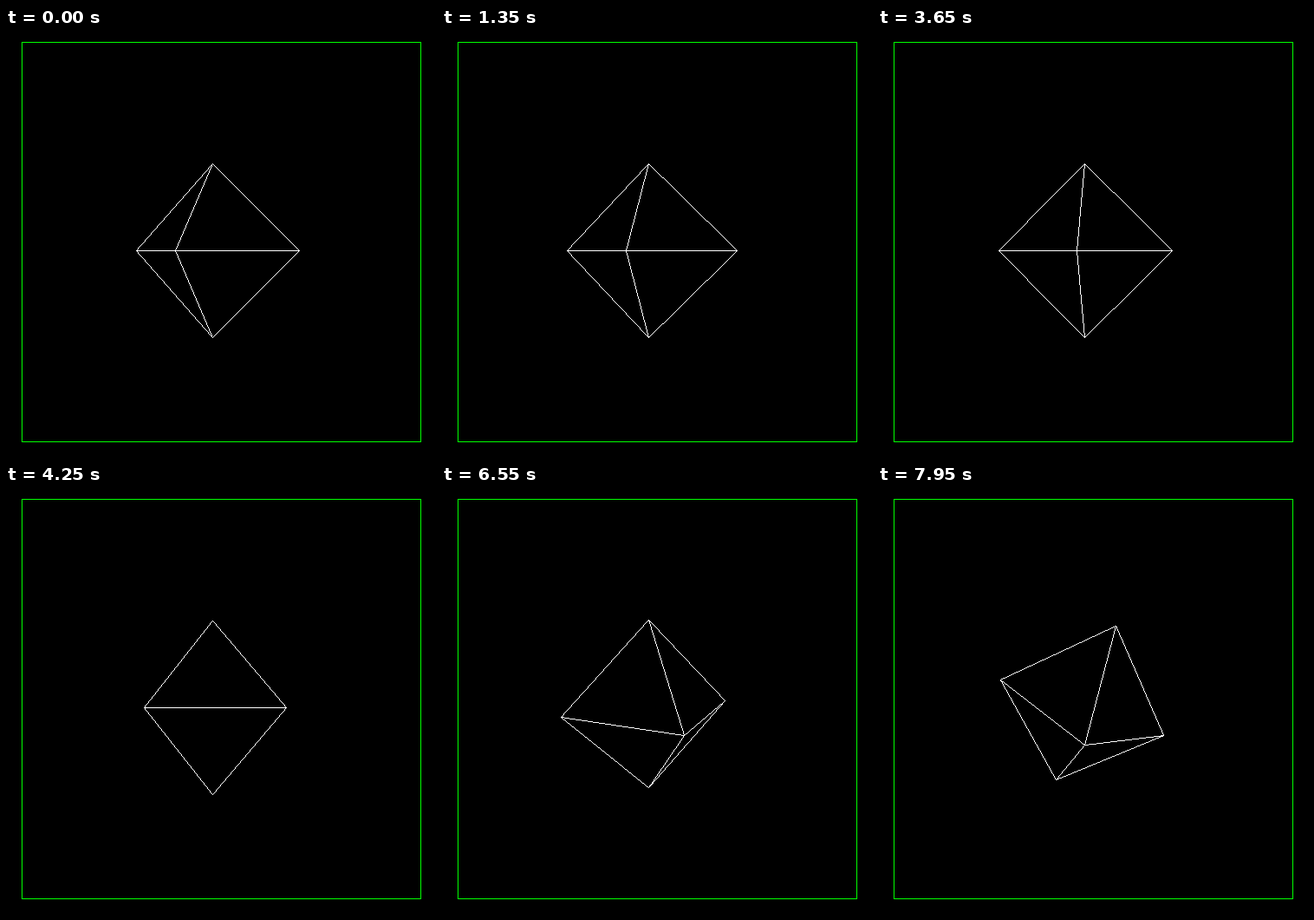
Write an HTML page with a canvas that moves like this. It is 496x494 px and loops after 8000 ms.

```html
<!DOCTYPE html>
<html>
<head>
<meta charset="utf-8">
<title>Rotating octahedron</title>
<style>
html, body { margin: 0; width: 100%; height: 100%; overflow: hidden; background: #000; }
canvas { display: block; }
</style>
</head>
<body>
<canvas id="stage" width="496" height="494"></canvas>
<script>
const ctx = document.getElementById('stage').getContext('2d');
const LOOP = 8000, TICK = 50, CUT = 6150;
const CX = 238, CY = 256, SIZE = 100, EYE = 5;
const GROW = 1.0017; // edges sit slightly outside their corners
const STEP = 2 * Math.PI / 180;

// steps done while a key is held from one time to another
const hold = (t, from, to, steps) =>
  steps * Math.min(1, Math.max(0, (t - from) / (to - from)));

function pose(t) {
  if (t >= CUT) return { turn: 10 * STEP, tilt: (20 - Math.floor(hold(t, CUT, 7950, 55))) * STEP };
  const done = hold(t, 0, 2550, 76) + hold(t, 3000, 3050, 1)
    + hold(t, 3500, 4300, 25) + hold(t, 4350, 4950, 19)
    + hold(t, 5150, 5200, 1) + hold(t, 5650, CUT, 15);
  return { turn: (-10 - Math.ceil(done)) * STEP, tilt: 0 };
}

function project([x, y, z]) {
  const s = SIZE / (1 - z / EYE);
  return [Math.floor(x * s), -Math.floor(y * s)];
}

// one pixel wide line without smoothing, relative to the centre
function line(a, b) {
  const u = Math.abs(b[0] - a[0]) >= Math.abs(b[1] - a[1]) ? 0 : 1, v = 1 - u;
  const slope = (b[v] - a[v]) / (b[u] - a[u] || 1);
  const base = (a[v] - slope * a[u]) * GROW;
  const p = [];
  for (p[u] = Math.min(a[u], b[u]); p[u] <= Math.max(a[u], b[u]); p[u]++) {
    p[v] = Math.round(base + slope * p[u]);
    ctx.fillRect(CX + p[0], CY + p[1], 1, 1);
  }
}

function draw(t) {
  ctx.fillStyle = '#000';
  ctx.fillRect(0, 0, 496, 494);
  ctx.strokeStyle = '#0f0';
  ctx.strokeRect(18.5, 16.5, 460, 460);

  const { turn, tilt } = pose(t);
  const sin = Math.sin(tilt), cos = Math.cos(tilt);
  const lean = (x, y, z) => [x, y * cos - z * sin, y * sin + z * cos];
  const ring = [0, 1, 2, 3].map(i => {
    const a = turn + i * Math.PI / 2;
    return lean(Math.sin(a), 0, Math.cos(a));
  });

  ctx.fillStyle = '#fff';
  for (const pole of [lean(0, 1, 0), lean(0, -1, 0)])
    ring.forEach((a, i) => {
      const face = [pole, a, ring[(i + 1) % 4]];
      if (EYE * face.reduce((sum, p) => sum + p[2], 0) <= 1) return; // faces away
      const [p, q, r] = face.map(project);
      line(p, q);
      line(q, r);
      line(r, p);
    });
}

const start = performance.now();
function frame() {
  const t = (performance.now() - start) % LOOP;
  draw(Math.floor(t / TICK) * TICK);
  requestAnimationFrame(frame);
}
frame();
</script>
</body>
</html>
```
